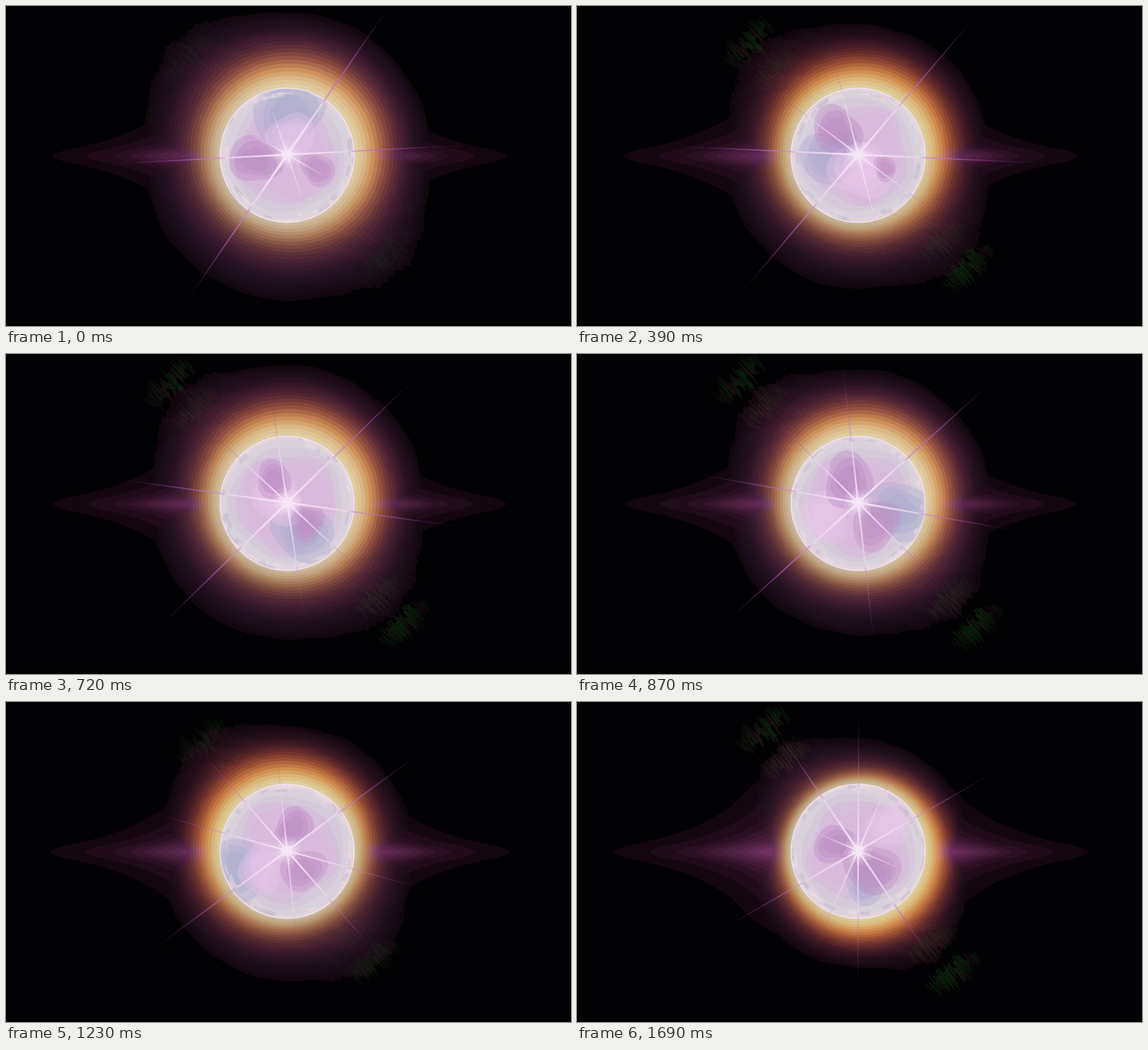
Write an HTML page with a canvas that moves like this. It is 848 by 480 pixels and loops after 1970 ms.

```html
<!DOCTYPE html>
<html lang="en">
<head>
<meta charset="utf-8">
<title>Glowing orb</title>
<style>
  html, body { margin: 0; width: 100%; height: 100%; overflow: hidden; background: #000; }
  canvas { display: block; width: 100vw; height: 100vh; }
</style>
</head>
<body>
<canvas id="stage" width="848" height="480"></canvas>
<script>
const ctx = document.getElementById('stage').getContext('2d');
const LOOP = 1970, CX = 422, CY = 224, ORB = 101, TAU = Math.PI * 2;

// Start time of each of the 38 steps
const starts = [0];
for (let i = 0; i < 37; i++) starts.push(starts[i] + (i === 0 || i % 5 === 4 ? 30 : 50));

const keys = [0, 210, 590, 870, 1230, 1510, 1690];
const pose = {
  top: [215, 187, 212, 201, 188, 203, 168],
  bottom: [217, 193, 210, 197, 193, 190, 174],
  vivid: [.25, 1, .4, .35, .8, .15, .75],
  hot: [50, 68, 58, 60, 110, -30, -40],
  patchDist: [212, 230, 250, 259, 211, 232, 234],
  patchAngle: [135, 134, 135, 134, 128, 128, 128],
  patchPower: [.5, .95, .9, .9, .65, .75, 1],
  flare: [343, 341, 343, 340, 346, 338, 358]
};

// Rays: angle, reach and strength outside the orb
const rays = [
  { angle: [55.5, 52.2, 46, 42.1, 36.3, 32.6, 30], reach: [275, 282, 272, 272, 250, 236, 246], power: [1, .9, .85, .9, .85, .75, .6] },
  { angle: [3, -.4, -6, -10, -15.6, -20, -23], reach: [266, 288, 278, 247, 214, 146, 74], power: [.9, .8, .85, .8, .55, .4, .3] },
  { angle: [150, 146, 138.7, 135, 131, 127.5, 124], reach: [72, 150, 172, 182, 200, 256, 195], power: [.3, .35, .4, .55, .7, .75, .9] },
  { angle: [109, 107, 100.5, 96.4, 96, 91.5, 89.8], reach: [76, 200, 165, 214, 140, 205, 212], power: [.3, .4, .35, .6, .3, .5, .5] },
  { angle: [80, 78, 75, 72, 70, 67, 66], reach: [0, 0, 0, 0, 10, 66, 172], power: [0, 0, 0, 0, .2, .3, .3] }
];

// Clouds inside the orb: centre and size at each key
const clouds = [
  { tint: [166, 168, 202], x: [425, 362, 410, 486, 350, 435, 437], y: [160, 178, 298, 235, 250, 284, 266], r: [43, 35, 34, 36, 35, 36, 28] },
  { tint: [232, 200, 232], x: [428, 415, 440, 372, 382, 458, 468], y: [193, 280, 195, 245, 250, 215, 184], r: [27, 38, 31, 30, 28, 17, 27] },
  { tint: [184, 134, 190], x: [374, 386, 397, 408, 432, 375, 389], y: [230, 186, 188, 190, 187, 221, 214], r: [30, 39, 14, 31, 23, 29, 25] },
  { tint: [188, 138, 192], x: [468, 466, 456, 448, 446, 416, 443], y: [245, 239, 250, 257, 252, 174, 250], r: [20, 14, 15, 29, 26, 29, 32] }
];

const parse = s => s.split(' ').map(h => [0, 2, 4].map(i => parseInt(h.substr(i, 2), 16)));
const soft = parse('e2d8b8 dec094 cb9060 94564a 623240 421f38 2b1528 1d0e1d 13080f');
const vivid = parse('dad6ac dcbc7a d08444 a0502c 6c2c26 441a20 2a121a 1b0a14 12050c');
const cool = parse('b8aca2 aa9078 8a6454 684040 4c2836 381c2e 261426 1a0d1b 12070f');

const lerp = (a, b, t) => a + (b - a) * t;
const mix = (a, b, t) => a.map((v, i) => lerp(v, b[i], t));
const rgba = (c, a = 1) => `rgba(${c.map(Math.round)},${a})`;
const rad = d => d * Math.PI / 180;

function at(list, t) {
  let i = 0;
  while (i < keys.length - 2 && t >= keys[i + 1]) i++;
  return lerp(list[i], list[i + 1], (t - keys[i]) / (keys[i + 1] - keys[i]));
}

function shade(pal, t) {
  const p = t * (pal.length - 1), i = Math.min(pal.length - 2, Math.floor(p));
  return mix(pal[i], pal[i + 1], p - i);
}

function random(seed) {
  return () => {
    seed = (seed * 1664525 + 1013904223) >>> 0;
    return seed / 4294967296;
  };
}

function blob(x, y, radius, color, steps = 180) {
  ctx.beginPath();
  for (let i = 0; i < steps; i++) {
    const a = i / steps * TAU, r = radius(a);
    ctx.lineTo(x + Math.cos(a) * r, y - Math.sin(a) * r);
  }
  ctx.closePath();
  ctx.fillStyle = color;
  ctx.fill();
}

function drawFlare(size) {
  const tips = [1, .85, .735, .665, .61, .56, .51, .465, .425];
  tips.forEach((tip, i) => {
    const s = size * tip / 343;
    const n = i / (tips.length - 1);
    ctx.save();
    ctx.translate(lerp(411, CX, n), 225);
    ctx.fillStyle = rgba(mix([19, 6, 15], [112, 47, 94], n));
    for (const sx of [-1, 1]) for (const sy of [-1, 1]) {
      ctx.beginPath();
      ctx.moveTo(0, 0);
      ctx.lineTo(sx * 343 * s, 0);
      ctx.quadraticCurveTo(sx * 338 * s, sy * 5 * s, sx * 318 * s, sy * 10 * s);
      ctx.quadraticCurveTo(sx * 215 * s, sy * 29 * s, sx * 165 * s, sy * 72 * s);
      ctx.quadraticCurveTo(sx * 115 * s, sy * 135 * s, 0, sy * 145 * s);
      ctx.fill();
    }
    ctx.restore();
  });
}

function drawGlow(p, t) {
  const bands = 21, dir = rad(p.hot), ux = Math.cos(dir), uy = -Math.sin(dir);
  const warm = pos => mix(shade(soft, pos), shade(vivid, pos), p.vivid);
  ctx.globalCompositeOperation = 'lighten';
  for (let k = 0; k < bands; k++) {
    const n = 1 - k / bands, push = 7 * Math.sin(Math.PI * n);
    const radius = a => {
      const outer = lerp(p.bottom, p.top, .5 + .5 * Math.sin(a));
      const bump = Math.pow(Math.abs(Math.cos(a - rad(p.patchAngle))), 14) * Math.sign(-1) * -1;
      const ripple = Math.sin(a * 7 + t / 170 + k) + Math.sin(a * 19 - k * 2) * .7;
      const jag = Math.sin(a * 67 + k) * Math.sin(a * 41 - t / 90) * 7 * bump;
      return ORB + (outer - ORB) * n + bump * 26 * n * n * n + (ripple + jag) * n * n;
    };
    const g = ctx.createLinearGradient(CX - ux * 165, CY - uy * 165, CX + ux * 165, CY + uy * 165);
    const hot = warm(n), dull = mix(shade(cool, n), hot, .25);
    g.addColorStop(.05, rgba(dull));
    g.addColorStop(.72, rgba(hot));
    blob(CX + ux * push, CY + uy * push, radius, g, 300);
  }
  ctx.globalCompositeOperation = 'source-over';
}

// Fringes of radial streaks on the upper left and lower right
function drawPatches(p) {
  ctx.globalCompositeOperation = 'lighten';
  for (const side of [0, 180]) {
    const rnd = random(side + 23);
    ctx.save();
    ctx.translate(CX, CY);
    ctx.rotate(-rad(p.patchAngle + side));
    for (const inner of [true, false]) {
      const dist = p.patchDist - (inner ? 57 : 0), count = inner ? 34 : 48;
      const width = inner ? 38 : 44;
      for (let i = 0; i < count; i++) {
        const n = (i + rnd()) / count * 2 - 1;
        const len = (14 + rnd() * 30) * (1 - n * n * .5);
        const red = rnd() < .3;
        const color = inner ? (red ? [62, 34, 28] : [44, 44, 28]) : (red ? [30, 12, 17] : [9, 35, 11]);
        const x = dist + (rnd() - .5) * 16 - len / 2;
        ctx.fillStyle = rgba(color, p.patchPower * (1 - n * n * .6) * (inner ? .55 : .9));
        ctx.beginPath();
        ctx.moveTo(x, n * width - 1.3);
        ctx.lineTo(x + len, n * width - .4);
        ctx.lineTo(x + len, n * width + .5);
        ctx.lineTo(x, n * width + 1.3);
        ctx.fill();
      }
    }
    ctx.restore();
  }
  ctx.globalCompositeOperation = 'source-over';
}

function drawOrb(t, step) {
  ctx.save();
  ctx.beginPath();
  ctx.arc(CX, CY, ORB, 0, TAU);
  ctx.clip();

  const layers = parse('e1d4dd d9d1db d6cada d5c0d9 d8bbdb');
  layers.forEach((c, i) => {
    const base = 105 - i * 10;
    blob(CX, CY, a => base + i * 1.2 * Math.sin(a * 3 + t / 260 + i) + i * Math.sin(a * 5 - i), rgba(c));
  });

  clouds.forEach((c, j) => {
    const x = at(c.x, t), y = at(c.y, t), r = at(c.r, t);
    for (let k = 0; k < 3; k++) {
      const size = r * (1.25 - k * .3);
      blob(x, y, a => size * (1 + .11 * Math.sin(a * 2 + j + t / 300) + .08 * Math.sin(a * 3 - j * 2 + k)),
        rgba(c.tint, .36), 80);
    }
  });

  // Mottled rim
  const rnd = random(400 + Math.floor(step / 3) * 7);
  for (let i = 0; i < 34; i++) {
    const a = rnd() * TAU, r = 91 + rnd() * 9, span = .06 + rnd() * .2;
    ctx.strokeStyle = rgba(rnd() < .5 ? [240, 222, 231] : [190, 179, 200], .4);
    ctx.lineWidth = 2 + rnd() * 5;
    ctx.beginPath();
    ctx.arc(CX, CY, r, a, a + span);
    ctx.stroke();
  }
  ctx.restore();

  ctx.strokeStyle = 'rgba(248,230,242,.9)';
  ctx.lineWidth = 1.5;
  ctx.beginPath();
  ctx.arc(CX, CY, ORB - .3, 0, TAU);
  ctx.stroke();
}

function drawRay(ray, t) {
  const reach = at(ray.reach, t), power = at(ray.power, t);
  if (reach < 5) return;
  const edge = Math.min(.9, ORB / reach);
  const g = ctx.createLinearGradient(0, 0, reach, 0);
  g.addColorStop(0, rgba([247, 233, 247], .95));
  g.addColorStop(edge * .9, rgba([239, 215, 239], .3 + .5 * power));
  g.addColorStop(edge, rgba([205, 145, 200], .2 + .6 * power));
  g.addColorStop(lerp(edge, 1, .4), rgba([156, 70, 156], .75 * power));
  g.addColorStop(1, rgba([100, 35, 105], 0));
  ctx.fillStyle = g;
  for (const turn of [0, Math.PI]) {
    ctx.save();
    ctx.translate(CX, CY - 1);
    ctx.rotate(turn - rad(at(ray.angle, t)));
    const w = .8 + power * .9;
    ctx.beginPath();
    ctx.moveTo(0, -w);
    ctx.lineTo(reach, -.4);
    ctx.lineTo(reach, .4);
    ctx.lineTo(0, w);
    ctx.fill();
    ctx.restore();
  }
}

function drawCore() {
  for (const [r, alpha] of [[20, .18], [14, .3], [9, .7]]) {
    blob(CX, CY - 1, a => r * (1 + .12 * Math.sin(a * 8)), rgba([245, 231, 245], alpha), 64);
  }
}

function draw(step) {
  const t = starts[step], p = {};
  for (const name in pose) p[name] = at(pose[name], t);
  ctx.fillStyle = '#020103';
  ctx.fillRect(0, 0, 848, 480);
  drawFlare(p.flare);
  drawGlow(p, t);
  drawPatches(p);
  drawOrb(t, step);
  rays.forEach(ray => drawRay(ray, t));
  drawCore();
  ctx.fillStyle = '#000';
  ctx.fillRect(0, 476, 848, 4);
}

let shown = -1;
const begin = performance.now();
function tick() {
  const time = (performance.now() - begin) % LOOP;
  let step = starts.length - 1;
  while (starts[step] > time) step--;
  if (step !== shown) draw(shown = step);
  requestAnimationFrame(tick);
}
tick();
</script>
</body>
</html>
```
